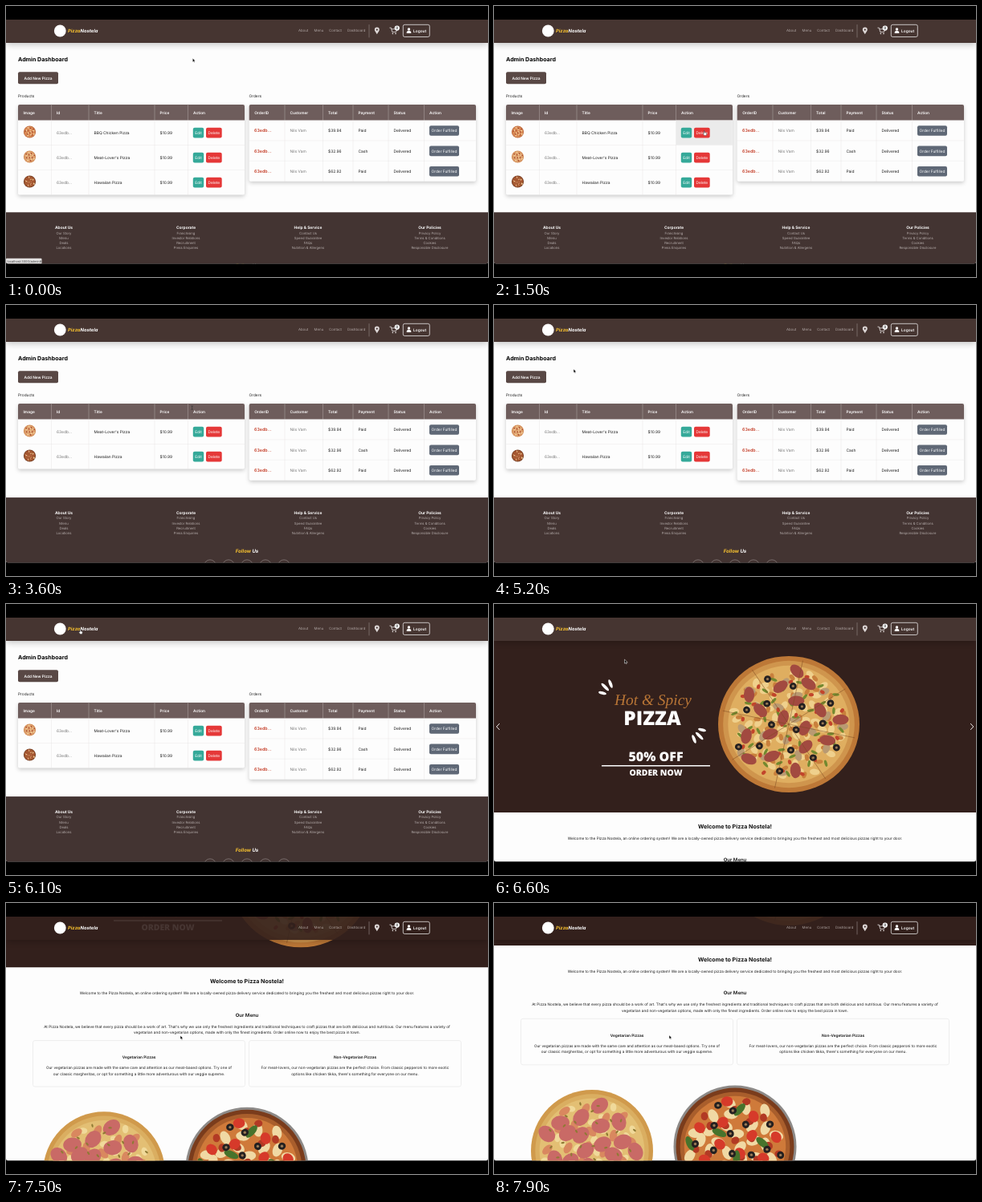
Recreate the animation shown at these times as an HTML page. Size 600 by 338 pixels, loop 8000 ms.

```html
<!DOCTYPE html>
<html lang="en">
<head>
<meta charset="utf-8">
<title>Pizza admin demo</title>
<style>
html, body { margin: 0; height: 100%; overflow: hidden; background: #000; }
svg { display: block; width: 600px; height: 338px; font-family: Inter, sans-serif; text-rendering: geometricPrecision; }
.mid { text-anchor: middle; }
.light { font-weight: 300; }
.semi { font-weight: 600; }
.bold { font-weight: 700; }
.logo { font-weight: 700; font-style: italic; }
.poster { font-family: "Open Sans", sans-serif; font-weight: 800; text-anchor: middle; }
.script { font-family: "Liberation Serif", serif; font-style: italic; }
.card { filter: drop-shadow(0 2px 2.5px #0003); }
.bar { filter: drop-shadow(0 2px 4px #0004); }
</style>
</head>
<body>
<svg id="stage" viewBox="0 0 600 338"></svg>
<script>
const INK = '#1c1c1c', BROWN = '#433432', HEAD = '#6e5d5c', DARK = '#33201c';
const stage = document.getElementById('stage');
const $ = id => document.getElementById(id);

const text = (x, y, s, size = 4.8, fill = INK, cls = '') =>
  `<text x="${x}" y="${y}" font-size="${size}" fill="${fill}" class="${cls}">${s}</text>`;
const rect = (x, y, w, h, fill, rx = 0, more = '') =>
  `<rect x="${x}" y="${y}" width="${w}" height="${h}" fill="${fill}" rx="${rx}" ${more}/>`;
const circle = (x, y, r, fill, more = '') =>
  `<circle cx="${x}" cy="${y}" r="${r}" fill="${fill}" ${more}/>`;
const path = (d, stroke, width = 0.8, fill = 'none') =>
  `<path d="${d}" stroke="${stroke}" stroke-width="${width}" fill="${fill}" stroke-linecap="round" stroke-linejoin="round"/>`;
const button = (x, y, w, label, fill) =>
  rect(x, y - 6.2, w, 12.6, fill, 2) + text(x + w / 2, y + 1.8, label, 4.8, '#fff', 'mid');

function randomFrom(seed) {
  return () => (seed = seed * 16807 % 2147483647) / 2147483647;
}

// toppings: [colour, count, length, thickness]
function pizza(x, y, r, crust, cheese, toppings, seed) {
  const rnd = randomFrom(seed);
  let s = circle(x, y, r, crust) + circle(x, y, r * 0.93, cheese, 'opacity=".55"') + circle(x, y, r * 0.86, cheese);
  for (const [fill, count, len, thick] of toppings) {
    const spin = rnd() * 6.28;
    for (let i = 0; i < count; i++) {
      const d = r * 0.8 * Math.sqrt((i + 0.4) / count), a = spin + i * 2.4 + rnd() * 0.3;
      const px = (x + d * Math.cos(a)).toFixed(1), py = (y + d * Math.sin(a)).toFixed(1);
      s += `<ellipse cx="${px}" cy="${py}" rx="${r * len}" ry="${r * thick}" fill="${fill}" transform="rotate(${Math.round(rnd() * 180)} ${px} ${py})"/>`;
      if (fill === '#242020') s += circle(px, py, r * len * 0.35, '#9a7a55');
    }
  }
  return s;
}

const thumbTops = [['#f3cf9a', 9, 0.16, 0.1], ['#a8482c', 8, 0.13, 0.1]];
const products = [
  ['BBQ Chicken Pizza', '#b9653a', '#d98a55'],
  ["Meat-Lover's Pizza", '#cf8650', '#dda06c'],
  ['Hawaiian Pizza', '#6f3a22', '#a45a32'],
];
const orders = [['$39.94', 'Paid'], ['$32.96', 'Cash'], ['$62.92', 'Paid']];
const footer = [
  [72, 'About Us', 'Our Story', 'Menu', 'Deals', 'Locations'],
  [224, 'Corporate', 'Franchising', 'Investor Relations', 'Recruitment', 'Press Enquiries'],
  [376, 'Help & Service', 'Contact Us', 'Speed Guarantee', 'FAQs', 'Nutrition & Allergens'],
  [527.5, 'Our Policies', 'Privacy Policy', 'Terms & Conditions', 'Cookies', 'Responsible Disclosure'],
];

function table(cols, right, titles, rows, rowHeight) {
  const left = cols[0], bottom = 142.5 + rows * rowHeight;
  let s = rect(left, 123, right - left, bottom - 123, '#fdfdfd', 2, 'class="card"');
  s += path(`M${left} 142.5V125q0-2 2-2H${right - 2}q2 0 2 2V142.5Z`, 'none', 0, HEAD);
  for (let i = 1; i < rows; i++) s += path(`M${left} ${142.5 + i * rowHeight}H${right}`, '#e6e4e4', 0.4);
  cols.forEach((x, i) => {
    if (i) s += path(`M${x} 123V142.5`, '#b3a8a7', 0.5) + path(`M${x} 142.5V${bottom}`, '#e3e1e1', 0.4);
    s += text(x + 6.5, 134.5, titles[i], 4.8, '#fff', 'semi');
  });
  return s;
}

function admin(list, shift) {
  let s = text(15, 68.6, 'Admin Dashboard', 7.1, '#000', 'bold')
    + rect(15, 82.3, 50, 15, '#594845', 2) + text(40, 91.6, 'Add New Pizza', 4.8, '#fff', 'semi mid')
    + text(15, 114, 'Products') + text(302.5, 114, 'Orders');
  s += table([15, 56.5, 103, 185, 226.5], 297, ['Image', 'Id', 'Title', 'Price', 'Action'], list.length, 31);
  s += rect(226.7, 142.7, 70.1, 30.6, '#ebebeb', 0, 'class="hover"');
  list.forEach(([name, crust, cheese], i) => {
    const y = 158 + i * 31;
    s += pizza(29.5, y - 1, 7.6, crust, cheese, thumbTops, 31 + name.length)
      + text(63, y + 1.8, '63edb...', 4.9, '#777') + text(109.5, y + 1.8, name, 4.9) + text(191.5, y + 1.8, '$10.99', 4.9)
      + button(232.8, y, 13.4, 'Edit', '#35a999') + button(249, y, 19.7, 'Delete', '#e53838');
  });
  s += table([302.7, 347, 394.5, 432, 476, 520.5], 585,
    ['OrderID', 'Customer', 'Total', 'Payment', 'Status', 'Action'], 3, 25.4);
  orders.forEach(([total, payment], i) => {
    const y = 155.4 + i * 25.4, b = y + 1.8;
    s += text(309, b, '63edb...', 5.3, '#c43c26', 'semi') + text(353.5, b, 'Nils Vam', 4.9, '#777')
      + text(401, b, total, 4.9) + text(438.5, b, payment, 4.9) + text(482.5, b, 'Delivered', 4.9)
      + button(527, y, 37, 'Order Fulfilled', '#5f6876');
  });
  s += `<g transform="translate(0 ${-shift})">` + rect(0, 257.3, 600, 110, BROWN);
  for (const [x, title, ...links] of footer) {
    s += text(x, 277.8, title, 4.9, '#fff', 'bold mid');
    links.forEach((link, i) => s += text(x, 284.5 + i * 6.25, link, 4.25, '#d6cfce', 'light mid'));
  }
  s += text(300, 326.3, '<tspan fill="#f9c330">Follow</tspan> Us', 6.1, '#fff', 'logo mid');
  for (let i = -2; i <= 2; i++) s += circle(300 + i * 23, 342.5, 7.5, 'none', 'stroke="#8d8180" stroke-width=".7"');
  return s + '</g>';
}

function petals() {
  return [[145, 99.5, 68, 5.6], [138.3, 103.5, 45, 6.5], [135, 111, 15, 5]].map(([x, y, a, r]) =>
    `<ellipse cx="${x}" cy="${y}" rx="${r}" ry="1.9" fill="#fff" transform="rotate(${a} ${x} ${y})"/>`).join('');
}

function home() {
  let s = rect(0, 46, 600, 214, DARK) + petals() + `<g transform="rotate(180 197 134)">${petals()}</g>`
    + text(150, 126, 'Hot & Spicy', 19.4, '#b87536', 'script')
    + text(197, 150.6, 'PIZZA', 24.4, '#fff', 'poster') + text(201.5, 196.4, '50% OFF', 16, '#fff', 'poster')
    + rect(134, 201, 135, 1.5, '#fff') + text(201.5, 214.2, 'ORDER NOW', 10.4, '#fff', 'poster');
  s += '<g transform="translate(367 150) scale(1 .967)">' + pizza(0, 0, 88, '#bd7837', '#dfae60', [
    ['#efd08c', 60, 0.07, 0.045], ['#c9803c', 45, 0.05, 0.03], ['#b99a72', 18, 0.08, 0.05],
    ['#73892f', 44, 0.05, 0.02], ['#c2452b', 32, 0.035, 0.025], ['#a24a40', 17, 0.115, 0.075], ['#242020', 15, 0.052, 0.05],
  ], 77);
  for (let i = 0; i < 4; i++) s += `<path d="M-84 0H84" stroke="#7d4a22" stroke-width=".8" opacity=".6" transform="rotate(${i * 45 + 12})"/>`;
  s += '</g>';
  s += text(300, 280, 'Welcome to Pizza Nostela!', 7.1, '#111', 'bold mid')
    + text(300, 294.2, 'Welcome to the Pizza Nostela, an online ordering system! We are a locally-owned pizza delivery service dedicated to bringing you the freshest and most delicious pizzas right to your door.', 4.72, INK, 'mid')
    + text(300, 321.3, 'Our Menu', 6, '#111', 'semi mid')
    + text(300, 335.4, "At Pizza Nostela, we believe that every pizza should be a work of art. That's why we use only the freshest ingredients and traditional techniques to craft pizzas that are both delicious and nutritious. Our menu features a variety of", 4.72, INK, 'mid')
    + text(300, 342.7, 'vegetarian and non-vegetarian options, made with only the finest ingredients. Order online now to enjoy the best pizza in town.', 4.72, INK, 'mid');
  [
    [165.5, 'Vegetarian Pizzas', 'Our vegetarian pizzas are made with the same care and attention as our meat-based options. Try one of', 'our classic margheritas, or opt for something a little more adventurous with our veggie supreme.'],
    [434.5, 'Non-Vegetarian Pizzas', 'For meat-lovers, our non-vegetarian pizzas are the perfect choice. From classic pepperoni to more exotic', "options like chicken tikka, there's something for everyone on our menu."],
  ].forEach(([x, title, a, b]) => {
    s += rect(x - 132, 351.3, 264, 57.5, '#fdfdfd', 2.5, 'stroke="#e4e4e4" stroke-width=".6"')
      + text(x, 374.2, title, 4.8, '#111', 'semi mid') + text(x, 387, a, 4.72, INK, 'mid') + text(x, 394.3, b, 4.72, INK, 'mid');
  });
  s += pizza(122, 516, 76, '#d09a4c', '#e3bf74', [
    ['#f0d99a', 45, 0.07, 0.05], ['#d9885f', 22, 0.1, 0.06], ['#c96a66', 22, 0.15, 0.12], ['#8f7a34', 40, 0.03, 0.015],
  ], 15);
  s += circle(300, 511, 76.5, '#8d8a88') + pizza(300, 511, 73.5, '#7a3c1c', '#cf7a3a', [
    ['#f0d9a4', 32, 0.12, 0.08], ['#b23a24', 22, 0.07, 0.06], ['#d63a2a', 13, 0.1, 0.085], ['#47732c', 7, 0.13, 0.06], ['#242020', 16, 0.065, 0.06],
  ], 42);
  return s;
}

function navbar() {
  let s = rect(0, 17, 600, 29, DARK, 0, 'opacity=".9" class="bar"') + circle(67.3, 31, 7.4, '#fff')
    + text(77, 33, '<tspan fill="#f9c330">Pizza</tspan>Nostela', 5.8, '#fff', 'logo');
  [[364, 'About'], [383.6, 'Menu'], [402, 'Contact'], [425, 'Dashboard']].forEach(([x, label]) =>
    s += text(x, 32.4, label, 4.4, '#cfc7c5', 'light'));
  s += path('M452 23.5V39', '#8d8280', 0.7)
    + path('M461.8 35.2C460 32.4 458.8 31.2 458.8 29.6a3 3 0 0 1 6 0C464.8 31.2 463.6 32.4 461.8 35.2Z', 'none', 0, '#ddd7d6') + circle(461.8, 29.6, 1.1, BROWN)
    + path('M477.8 27.2H479.4L480.8 32.4H485.6L486.6 28.8H480', '#e8e3e2', 0.8) + circle(481.4, 34.4, 0.8, '#e8e3e2') + circle(485, 34.4, 0.8, '#e8e3e2')
    + circle(486.8, 27.6, 3.1, '#fff') + text(486.8, 29.3, '0', 4.6, '#222', 'semi mid')
    + rect(494.3, 23.3, 33, 15.2, 'none', 2, 'stroke="#fff" stroke-width=".7"')
    + circle(501.5, 29, 1.7, '#fff') + path('M498.7 34V33q0-2 2-2H502.3q2 0 2 2V34Z', 'none', 0, '#fff')
    + text(507, 32.7, 'Logout', 4.8, '#fff', 'semi');
  return s;
}

const chevrons = path('M6.6 149.4L3.2 153L6.6 156.6M593.4 149.4L596.8 153L593.4 156.6', '#fff', 0.9);
const cursors = {
  arrow: path('M0 0V4.6L1.1 3.6L1.9 5.2L2.7 4.8L2 3.3H3.4Z', '#fff', 0.5, '#000'),
  beam: path('M-1 -1.8Q0 -1.8 0 -1V2.4Q0 3 -1 3M1 -1.8Q0 -1.8 0 -1M0 2.4Q0 3 1 3', '#333', 0.6),
  hand: path('M0 0V3L-1 2.4L-1.4 3L.2 5.4H2.8L3.4 2.4L.9 1.8V0Q.4 -.6 0 0Z', '#222', 0.4, '#fff'),
};

stage.innerHTML = `
  <clipPath id="window"><path d="M0 17H600V319q0 2.3-2.3 2.3H2.3Q0 321.3 0 319Z"/></clipPath>
  <g clip-path="url(#window)">
    ${rect(0, 17, 600, 305, '#fdfdfd')}
    <g id="before">${admin(products, 0)}</g>
    <g id="after">${admin(products.slice(1), 17.2)}</g>
    <g id="home">${home()}</g>
    ${navbar()}
    <g id="chevrons">${chevrons}</g>
    <g id="status">${rect(0, 314.8, 44.5, 7, '#e2e0e0', 1)}${text(1.5, 319.6, 'localhost:3000/admin#', 3.9, '#444')}</g>
    ${Object.keys(cursors).map(k => `<g id="${k}">${cursors[k]}</g>`).join('')}
  </g>`;

const LOOP = 8000, DELETED = 2400, OPENED = 6200, SCROLL = 6800;
// pointer stops: time, x, y
const stops = [
  [0, 232.3, 65.3], [100, 232.3, 65.3], [1200, 261.5, 156], [2500, 261.5, 156], [3500, 231.6, 127.5], [3800, 231.6, 127.5],
  [5100, 99, 80], [5300, 99, 80], [5900, 92, 32], [6200, 92, 32], [6600, 162.5, 69.5], [7100, 216, 166], [7900, 218, 165], [LOOP, 218, 165],
];

function pointerAt(t) {
  const i = stops.findIndex(s => s[0] > t);
  const [t0, x0, y0] = stops[i - 1], [t1, x1, y1] = stops[i];
  const u = (t - t0) / (t1 - t0), e = u * u * (3 - 2 * u);
  return [x0 + (x1 - x0) * e, y0 + (y1 - y0) * e];
}

const show = (el, on) => el.style.display = on ? '' : 'none';
const hovers = [...document.querySelectorAll('.hover')];

function draw(now) {
  const t = now % LOOP, [x, y] = pointerAt(t);
  const inside = (l, top, r, b) => x > l && x < r && y > top && y < b;
  const atHome = t >= OPENED;
  show($('before'), t < DELETED);
  show($('after'), t >= DELETED && !atHome);
  show($('home'), atHome);
  show($('chevrons'), atHome);
  show($('status'), t < 500);
  hovers.forEach(h => show(h, inside(226, 142, 297, 173)));

  const u = Math.min(1, Math.max(0, (t - SCROLL) / 1100));
  const move = `translate(0 ${-207 * (1 - (1 - u) ** 2)})`;
  $('home').setAttribute('transform', move);
  $('chevrons').setAttribute('transform', move);

  const onButton = inside(59, 23, 116, 39) || !atHome && (inside(15, 82, 65, 97) || inside(249, 151, 269, 165));
  const kind = onButton ? 'hand' : !atHome && inside(230, 126, 252, 138) ? 'beam' : 'arrow';
  for (const k in cursors) show($(k), k === kind);
  $(kind).setAttribute('transform', `translate(${x} ${y})`);
  requestAnimationFrame(() => draw(performance.now()));
}
draw(performance.now());
</script>
</body>
</html>
```
